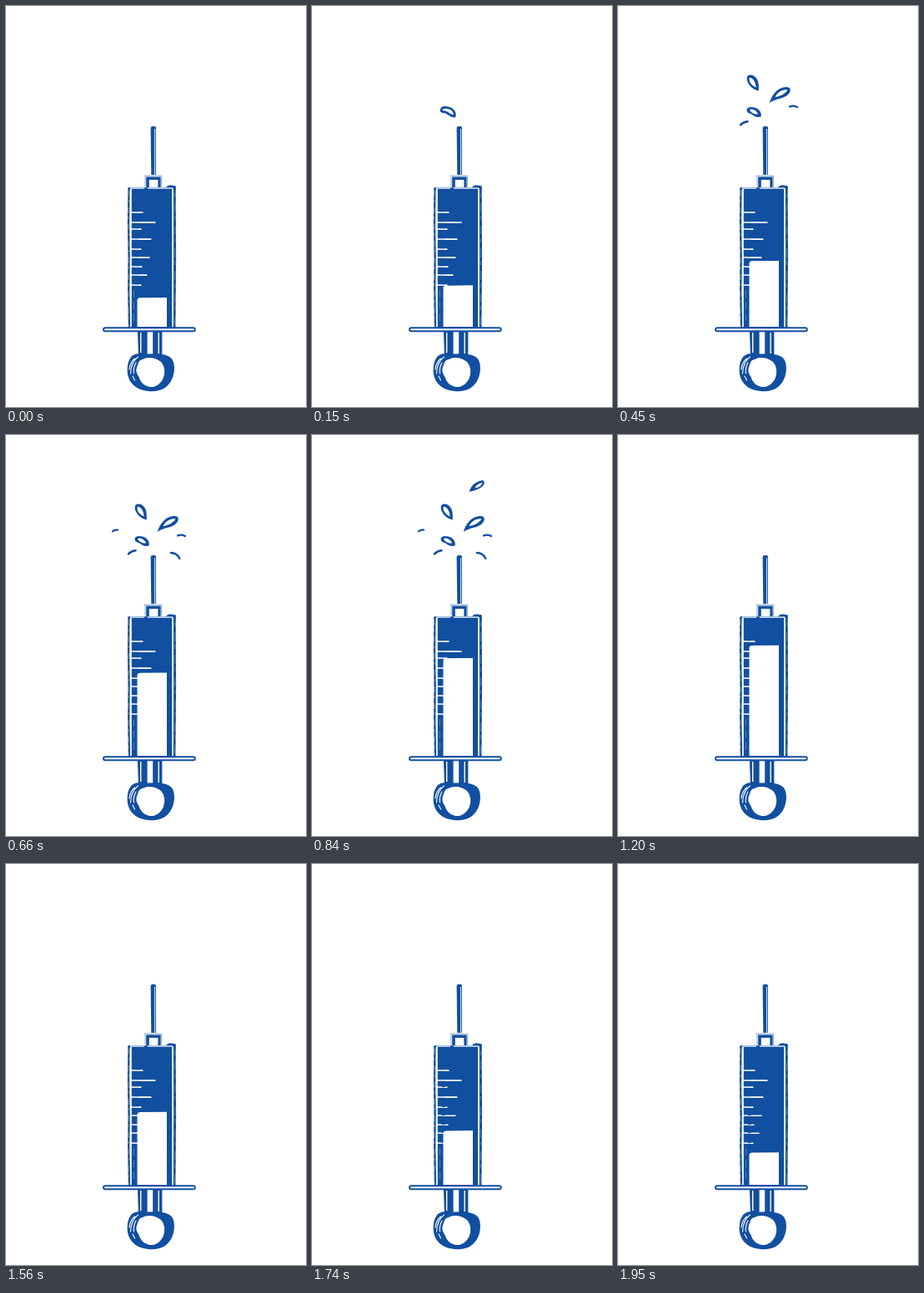
Animation of 360 by 480 pixels, one loop 1.98 s. Source, as an HTML page:

```html
<!DOCTYPE html>
<html lang="en">
<head>
<meta charset="utf-8">
<title>Syringe</title>
<style>
  html, body { margin: 0; width: 100%; height: 100%; overflow: hidden; background: #fff; }
  svg { display: block; width: 100vw; height: 100vh; }
  .ink { fill: #114fa0; }
  .line { fill: none; stroke: #114fa0; stroke-linecap: round; stroke-linejoin: round; }
  .paper { fill: #fff; }
  .gap { fill: none; stroke: #fff; }
  .drop { fill: #114fa0; fill-rule: evenodd; }
</style>
</head>
<body>
<svg viewBox="0 0 360 480">
  <!-- Liquid and its moving lower edge -->
  <rect class="ink" x="150" y="219" width="49.5" height="166"/>
  <path class="paper" id="empty"/>
  <g id="ticks"></g>

  <!-- Needle and hub -->
  <path class="ink" d="M173.6 146Q173.6 144 176 144H178.2Q180 144 180 146V202H174.3Z"/>
  <path class="gap" d="M178.6 147V202" stroke-width="1" opacity=".9"/>
  <path class="line" d="M166 203.2H186.6M167 204V216M186.6 204V216" stroke-width=".7" opacity=".7"/>
  <path class="ink" d="M168.2 204.5H185.6V217H182.4V208H171.8V217H168.2Z"/>

  <!-- Barrel walls -->
  <path class="line" d="M147.4 219L147 260L147.6 300L147.2 340L148 384" stroke-width="2.4"/>
  <path class="gap" d="M146.9 221V384" stroke-width=".5" stroke-dasharray="7 4 3 6" opacity=".8"/>
  <path class="line" d="M202.2 217L202.6 300L202 384" stroke-width="3"/>
  <path class="gap" d="M202.6 224V384" stroke-width=".5" stroke-dasharray="5 7 11 4" opacity=".6"/>
  <path class="ink" d="M146.5 217.3H192Q194 213.8 198 214.5L203.6 215.5V219.3H146.5Z"/>
  <path class="gap" d="M150 219V384" stroke-width="1.5"/>
  <path class="gap" d="M200 218V384" stroke-width="1.3"/>
  <path class="gap" d="M149 218.2H166M170 218.2H200" stroke-width="1.3"/>
  <path class="gap" d="M153.5 340V380" stroke-width=".4" stroke-dasharray="9 5" opacity=".7"/>

  <!-- Plunger -->
  <path class="ink" d="M157.9 389H187.4V420H159Z"/>
  <path class="paper" d="M169.6 390H176.2V416.5H169.6Z"/>
  <path class="gap" d="M161.7 391V415M183.2 391V416" stroke-width="1.4"/>
  <rect class="ink" x="116" y="384.3" width="111.8" height="6" rx="3"/>
  <path class="gap" d="M119 387.2H225" stroke-width="2" stroke-linecap="round"/>
  <path class="ink" d="M150.5 419.5C155 415 162 415.5 169 417C181 416 194 415.5 199.5 423C203.5 430 202.5 442 197.5 450C191 459.5 182 462 171 461C157 460 148 452 146 441C145 432 146 425 150.5 419.5Z"/>
  <path class="paper" d="M158.5 428.5C160 422.5 163.5 424 166 422C172 419.5 181 421.5 186 426C190.5 431 191.5 439 188.5 446C185 453 179.5 456.5 172.5 456C165 454.5 161.5 450 159.5 444C155 438 156 434 158.5 428.5Z"/>
  <path class="gap" d="M158.5 420Q150 426 149.5 440M154.5 422Q148.5 427 148 435M156 427Q152.5 433 153.5 440M152 443L154.5 448" stroke-width="1.1" stroke-linecap="round"/>
  <g id="spray"></g>
</svg>
<script>
const LOOP = 1980, STEP = 30, TURN = 1110;
const FULL = 349, LOW = 240.6;
const SVG = 'http://www.w3.org/2000/svg';
const empty = document.getElementById('empty');

function add(parentId, attrs) {
  const path = document.createElementNS(SVG, 'path');
  for (const [name, value] of Object.entries(attrs)) path.setAttribute(name, value);
  document.getElementById(parentId).append(path);
  return path;
}

// Scale marks: height and right end
[[247, 164], [259, 179], [267, 162], [279, 174], [291, 162],
 [301, 172], [312, 163], [322, 169], [334, 162]].forEach(([y, end]) => {
  add('ticks', { d: `M160 ${y + .3}H${end}`, class: 'line', style: 'stroke:#f0f2f6', 'stroke-width': 1.5 });
  add('ticks', { d: `M150 ${y}L${end} ${y + .3}`, class: 'gap', 'stroke-width': 1.4 });
});

// Each mark is visible from its start until its end; whole drops have a hole, dashes a width
const drops = [
  [90, 210, 'M155.3 126C154 120 162 121 167 123C171 126 172 130 171 132C165 132 164 128 160 127C157 126 156.5 127 155.3 126Z', 2.8],
  [210, TURN, 'M154.5 124C155.5 119.5 163 120.5 167.5 123C171.5 126 172.5 130 171.5 132.5C167 134 162 131.5 160.5 129.5C157 128.5 154.5 127.5 154.5 124ZM158 124.2C160 122.5 166 124.5 168 129.5C164 129.8 159 127.5 158 124.2Z'],
  [180, TURN, 'M147 142.3Q150 139 155.5 138.2', 2.5],
  [270, TURN, 'M181.8 116C184 108 190 98 201 97C207.5 96.5 208.5 101 204.5 105.5C199.5 111.5 190 110 181.8 116ZM188.5 109C193 108.5 200 106 203.5 100.5C198 99 191.5 103 188.5 109Z'],
  [360, TURN, 'M169 101.5C161 100.5 153.5 92 154.8 85C157 81 163.5 82 167 88C169.5 92.5 168.5 97 169 101.5ZM165.5 97.5C160 95 156.5 90 157.8 85.8C161.5 85.5 165.5 91 165.5 97.5Z'],
  [450, TURN, 'M206 120.5Q210 118.7 215 121', 2.3],
  [570, TURN, 'M128 115.3Q130 113.2 134 113.6', 2.3],
  [660, TURN, 'M198 141Q205 141 208.3 147.8', 2.5],
  [750, TURN, 'M188.8 68C190.5 60 198 54.5 205.5 54.2C209.5 59.5 203 65 188.8 68ZM195.5 63.5C200 63 204 60.5 204.3 57.2C200.5 57.5 197 60 195.5 63.5Z']
].map(([start, end, d, width]) => ({
  start, end,
  path: add('spray', width ? { d, class: 'line', 'stroke-width': width } : { d, class: 'drop' })
}));

function liquidLevel(t) {
  return t < TURN
    ? FULL + (LOW - FULL) * t / TURN
    : LOW + (FULL - LOW) * (t - TURN) / (LOOP - TURN);
}

function draw(t) {
  const y = liquidLevel(t);
  empty.setAttribute('d', `M157.5 384V${y + 2.5}Q158 ${y + .3} 161 ${y + .3}L193 ${y}V384Z`);
  for (const { start, end, path } of drops) {
    path.style.display = t >= start && t < end ? '' : 'none';
  }
}

const begin = performance.now();
function tick() {
  const t = (performance.now() - begin) % LOOP;
  draw(Math.floor(t / STEP) * STEP);
  requestAnimationFrame(tick);
}
tick();
</script>
</body>
</html>
```
